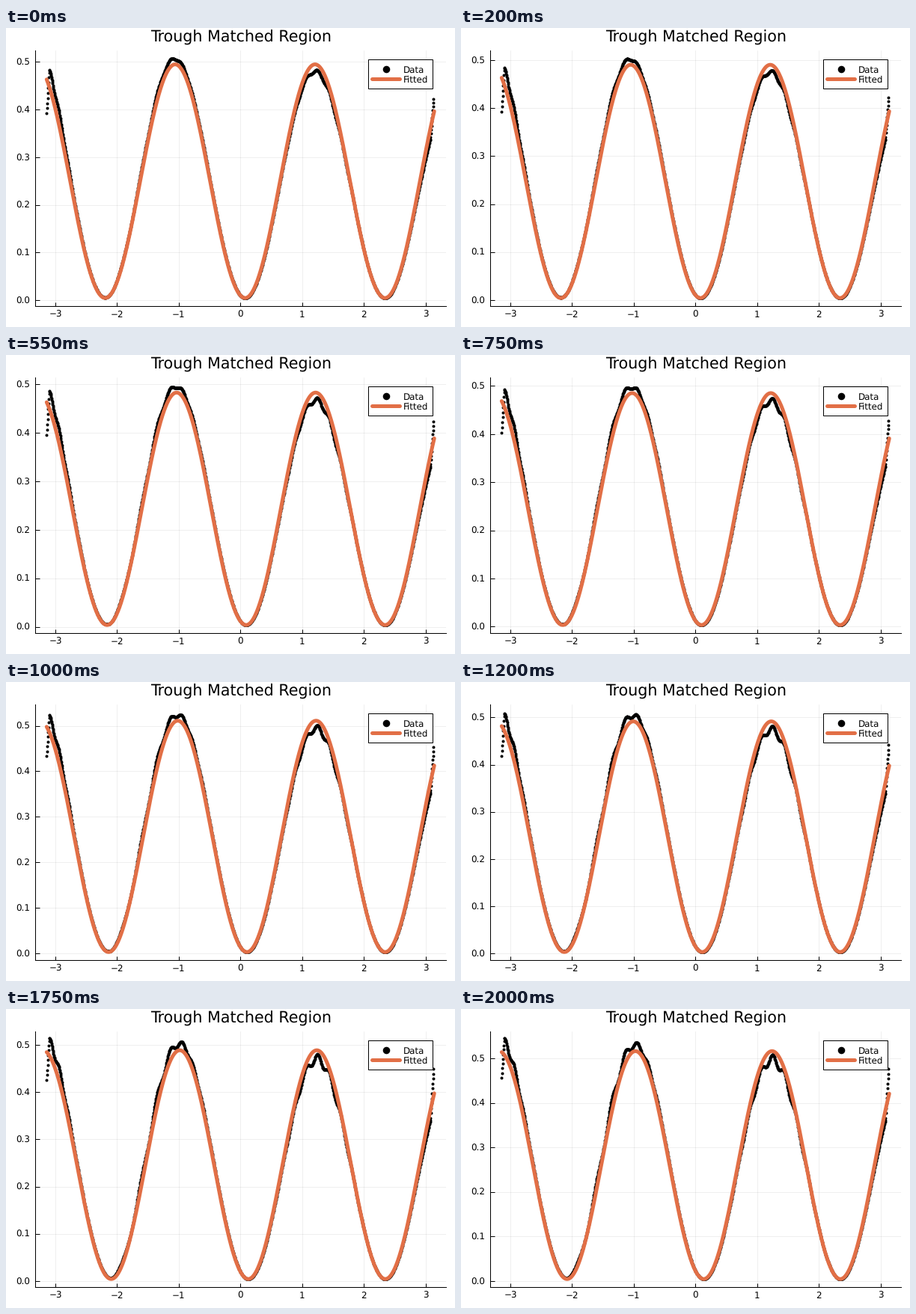
A matplotlib script for the animation above (2.05 s loop, 600x400 px).

```python
import numpy as np
import matplotlib.pyplot as plt
from matplotlib.animation import FuncAnimation
from matplotlib.lines import Line2D
from matplotlib.patches import Rectangle

W, H, DPI = 600, 400, 100
FRAMES, STEP = 41, 50
ORANGE = "#e26f46"
PX = 72 / DPI  # points per pixel
LABEL = 11.85 * PX

plt.rcParams["font.family"] = "DejaVu Sans"
plt.rcParams["text.hinting"] = "no_hinting"

x = np.linspace(-np.pi, np.pi, 1300)
x_data = np.linspace(-np.pi, np.pi - .01, 1300)


def mix(a, b, u):
    return a + (b - a) * u


def swell(centre, width, offset, ripple=0, turns=0):
    """Bell-shaped deviation carrying a ripple; turns counts its periods."""
    bell = np.exp(-((x_data - centre) / width) ** 2 / 2)
    return bell * (offset + ripple * np.cos(2 * np.pi * turns))


def deviation(u):
    """How far the data stray from the fit, growing rougher with u."""
    d = x_data + 1.14
    left = swell(-3.08, .2, mix(.032, .028, u), mix(.005, .010, u),
                 (x_data + 3.09) / .16)
    first = swell(-1.3, .4, mix(.0145, .020, u), mix(.003, .010, u),
                  d / .207 + 1.38 * d ** 2)
    second = swell(1.3, .33, mix(-.015, -.019, u), mix(.004, .011, u),
                   (x_data - 1.25) / .19)
    right = swell(np.pi, .15, -.024)
    drop = np.clip(1 - (x_data - x_data[0]) / .042, 0, 1)
    rise = np.clip(1 - (x_data[-1] - x_data) / .05, 0, 1)
    return (left + first + second + right
            - mix(.100, .080, u) * drop + mix(.055, .085, u) * rise)


def curves(i):
    u = i / (FRAMES - 1)
    peak = np.interp(i, [0, 14, 20, 27, 35, 40],
                     [.495, .480, .511, .477, .489, .516])
    base = .0024 + .0012 * (2 * u - 1) ** 2
    span = peak * mix(1.020, 1.046, u)
    low = base + .001
    trough, period = mix(.075, .134, u), mix(2.268, 2.215, u)

    def fit(t):
        wave = np.cos(2 * np.pi * (t - trough) / period)
        return (peak + low) / 2 - (peak - low) / 2 * wave

    data = np.maximum(fit(x_data) + deviation(u), base)
    return fit(x), data, base, span


fig = plt.figure(figsize=(W / DPI, H / DPI), dpi=DPI, facecolor="white")
left, right, top, bottom = 38.8, 587.8, 30.4, 371.5
ax = fig.add_axes([left / W, 1 - bottom / H,
                   (right - left) / W, (bottom - top) / H])
ax.set_xlim(-1.06 * np.pi, 1.06 * np.pi)
ax.set_xticks(range(-3, 4))
ax.set_yticks(np.arange(0, .61, .1))
ax.yaxis.set_major_formatter("{x:.1f}")
ax.set_axisbelow(True)
ax.grid(color="black", alpha=.1, lw=.6 * PX)
ax.spines[["top", "right"]].set_visible(False)
ax.spines[["left", "bottom"]].set_linewidth(PX)
ax.tick_params(direction="in", length=5.5 * PX, width=PX, labelsize=LABEL)
ax.tick_params(axis="x", pad=6.3 * PX)
ax.tick_params(axis="y", pad=7 * PX)
fig.text(314.3 / W, 1 - 18.4 / H, "Trough Matched Region",
         size=20.7 * PX, ha="center", va="baseline")

dots, = ax.plot([], [], "o", color="black", ms=4 * PX, mew=0, zorder=3)
line, = ax.plot([], [], color=ORANGE, lw=5 * PX, zorder=4,
                solid_capstyle="round", solid_joinstyle="round")

# Legend, placed in stage pixels with y pointing down
stage = fig.add_axes([0, 0, 1, 1], zorder=5)
stage.set(xlim=(0, W), ylim=(H, 0))
stage.axis("off")
stage.add_patch(Rectangle((484, 42), 86, 38.8, fc="white", ec="black", lw=PX))
stage.add_line(Line2D([508.3], [55], marker="o", color="black",
                      ms=9.6 * PX, mew=0))
stage.add_line(Line2D([489, 526.3], [67.9, 67.9], color=ORANGE, lw=5 * PX,
                      solid_capstyle="round"))
for y, label in ((59.5, "Data"), (72.6, "Fitted")):
    stage.text(531.2, y, label, size=LABEL, va="baseline")


def draw(i):
    fit, data, base, span = curves(i)
    dots.set_data(x_data, data)
    line.set_data(x, fit)
    ax.set_ylim(base - .03 * span, base + 1.03 * span)
    return dots, line


anim = FuncAnimation(fig, draw, frames=FRAMES, interval=STEP,
                     repeat=True, repeat_delay=0, blit=False)
plt.show()
```
